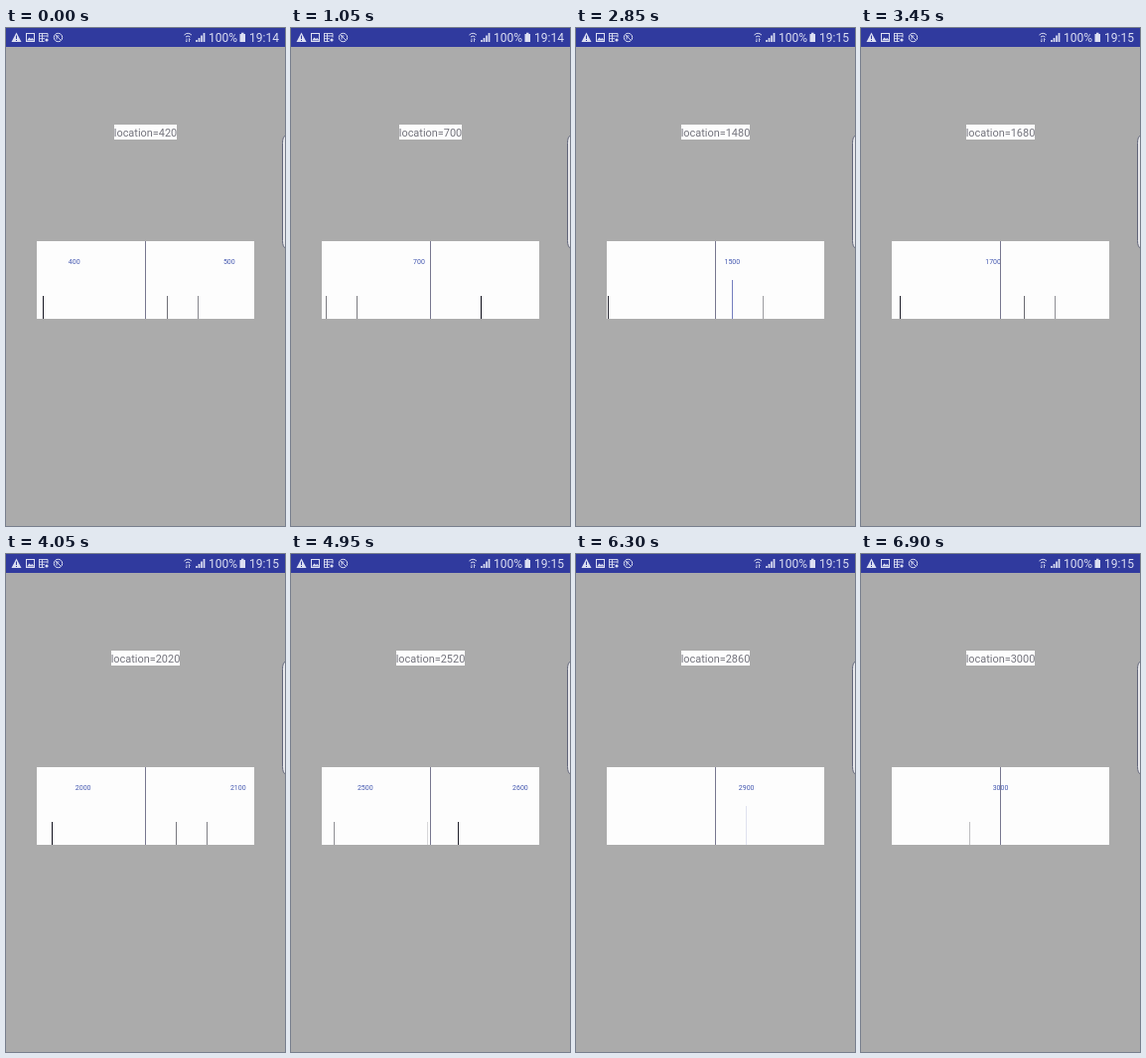
An HTML page for the animation above (7050 ms loop, 281x500 px).

```html
<!DOCTYPE html>
<html lang="en">
<head>
<meta charset="utf-8">
<title>Ruler</title>
<style>
  html, body { margin: 0; height: 100%; overflow: hidden; background: #ababab; }
  svg { display: block; width: 100vw; height: 100vh; font-family: Roboto, "Liberation Sans", sans-serif; }
  .label { font-size: 7px; fill: #4458b0; text-anchor: middle; }
</style>
</head>
<body>
<svg viewBox="0 0 281 500">
  <clipPath id="card"><rect x="31" y="214" width="219" height="78"/></clipPath>
  <rect width="281" height="500" fill="#ababab"/>
  <rect width="281" height="19" fill="#303a9e"/>

  <!-- status bar -->
  <g fill="none" stroke="#dcdff2">
    <path d="M10.5 4.5L15.5 14H5.5Z" fill="#dcdff2" stroke="none"/>
    <path d="M10.5 7.5v3.5m0 1v1" stroke="#303a9e"/>
    <rect x="20.5" y="5.5" width="8" height="8"/>
    <path d="M21 12.5l2.5-3 1.5 1.5 1.5-1 2 2.500z" fill="#dcdff2" stroke="none"/>
    <path d="M33.500 5.500h8.500v4M33.500 5v8.500h5M33 8h9M33 10.700h6M36.500 5.500v8" stroke-width=".9"/>
    <circle cx="41" cy="12" r="1.600" fill="#dcdff2" stroke="none"/>
    <circle cx="52.500" cy="9.500" r="4.200"/>
    <path d="M50 7l5 5M51 11.500v-3.500h2.500" stroke-width=".9"/>
    <path d="M179.500 7q3.700-3.400 7.400 0M181 9q2.200-2 4.400 0" />
    <path d="M182 10.500v3.500m-1-1.200l1 1.200M184.500 14v-3.500m1 1.200l-1-1.200" stroke-width=".8"/>
    <path d="M192 14v-2M194.500 14v-4M197 14v-6.500M199.500 14v-9" stroke-width="1.700"/>
    <path d="M235.500 6h1.500v-1.200h2.500v1.200h1.500v8h-5.500z" fill="#dcdff2" stroke="none"/>
  </g>
  <g fill="#dcdff2" font-size="12">
    <text x="204" y="14">100%</text>
    <text id="clock" x="245" y="14">19:14</text>
  </g>

  <!-- edge handle -->
  <path d="M282 107.500q-3.500 1.500-3.500 8v98q0 6.500 3.500 8" fill="#e9e9ec" stroke="#606478"/>

  <rect id="plate" y="97" height="15" fill="#fdfdfd"/>
  <text id="location" x="140.500" y="108.500" font-size="10.930" fill="#73737c" text-anchor="middle"></text>

  <rect x="31" y="214" width="219" height="78" fill="#fdfdfd"/>
  <g id="ruler" clip-path="url(#card)"></g>
  <rect x="140" y="214" width="1" height="78" fill="#77778f"/>
</svg>
<script>
const LOOP = 7050, STEP = 150, MAX = 3000;
const PX = 281 / 1080;            // stage pixels per device pixel
const UNIT = 6 * PX;              // stage pixels per ruler unit
const $ = id => document.getElementById(id);

// time, position, speed
const flings = [
  [0, 446, .35], [1050, 707.36, 0], [2100, 1242.34, .6], [2850, 1489.19, .1],
  [4050, 2040.24, .5], [5700, 2760.08, 0], [6900, MAX, 0]
];

function position(t) {
  if (t >= 6900) return MAX;
  const i = Math.max(1, flings.findIndex(k => k[0] > t));
  const [t0, p0, v0] = flings[i - 1], [t1, p1, v1] = flings[i];
  const d = t1 - t0, u = (t - t0) / d, w = 1 - u;
  return p0 * w * w * (1 + 2 * u) + p1 * u * u * (3 - 2 * u) + d * u * w * (v0 * w - v1 * u);
}

// Hairlines fade in and out as they cross the pixel grid
function tick(v, x) {
  const col = Math.floor(x), alpha = 1 - Math.abs(x - col - .455) / .21 * .88;
  if (alpha < .11) return "";
  const long = v % 100 === 0, y = long ? 253 : 269;
  return `<rect x="${col}" y="${y}" width="1" height="${292 - y}" fill="${long ? "#303f9f" : "#0c0c18"}" opacity="${alpha}"/>`;
}

function draw(t) {
  const pos = position(t);
  let marks = "";
  for (let v = Math.ceil((pos - 80) / 20) * 20; v <= Math.min(MAX, pos + 80); v += 20) {
    const x = 140.5 + (v - pos) * UNIT;
    marks += tick(v, x);
    if (v % 100 === 0) marks += `<text class="label" x="${x}" y="237">${v}</text>`;
  }
  $("ruler").innerHTML = marks;

  // The readout trails the ruler slightly
  const shown = Math.floor((position(t - 30) + 2) / 20) * 20;
  $("location").textContent = "location=" + shown;
  const width = shown < 1000 ? 63 : 69;
  $("plate").setAttribute("x", shown < 1000 ? 109 : 106);
  $("plate").setAttribute("width", width);
  $("clock").textContent = t < 1500 ? "19:14" : "19:15";
}

const start = performance.now();
function frame() {
  const t = (performance.now() - start) % LOOP;
  draw(Math.floor(t / STEP) * STEP);
  requestAnimationFrame(frame);
}
frame();
</script>
</body>
</html>
```
